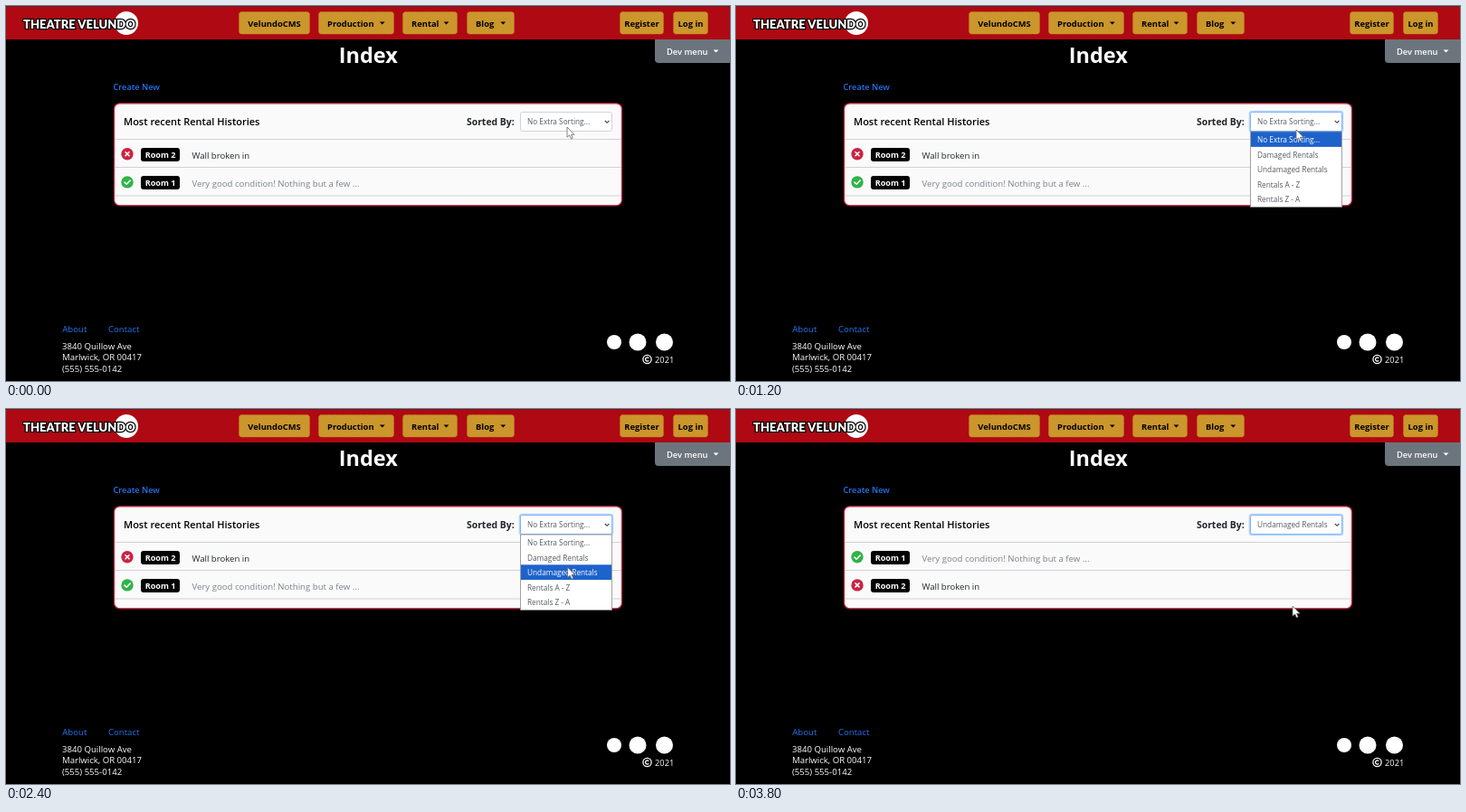
Animation, 800 px wide and 415 px high, one loop 3900 ms. Source, as an HTML page:

```html
<!DOCTYPE html>
<html lang="en">
<head>
<meta charset="utf-8">
<title>Rental histories</title>
<style>
  html, body { margin: 0; width: 100%; height: 100%; overflow: hidden; background: #000; }
  svg { display: block; width: 800px; height: 415px; font: 9.6px "Open Sans", sans-serif; }
  .brand { font: 900 13px Lato, sans-serif; fill: #fff; stroke: #000; stroke-width: 2.4; paint-order: stroke; stroke-linejoin: round; }
  .nav rect { fill: #cb962b; stroke: #b98722; stroke-width: .7; stroke-dasharray: 1.5 1; }
  .nav text { font-weight: 700; font-size: 9.4px; }
  .bold { font-weight: 700; }
  .semi { font-weight: 600; }
  .link { fill: #2474f0; }
  .white { fill: #fff; }
  .ink { fill: #212529; }
  .small { font-size: 8.25px; fill: #555b61; }
  .line { stroke: #d2d2d6; }
  .mark { fill: none; stroke: #fff; stroke-width: 1.6; stroke-linecap: round; stroke-linejoin: round; }
</style>
</head>
<body>
<svg viewBox="0 0 800 415">
  <defs><path id="caret" d="M-2.9-1.4H2.9L0 1.5Z"/></defs>
  <rect width="800" height="415"/>
  <rect width="800" height="37" fill="#af0913"/>
  <rect width="800" height="1" fill="#6b1a20"/>
  <circle cx="133" cy="19" r="13" fill="#fff"/>
  <text class="brand" x="19" y="24.8">THEATRE VELUNDO</text>
  <g class="nav" id="nav"></g>

  <path d="M800 37V63H721a4 4 0 0 1-4-4V37Z" fill="#6c757d"/>
  <text class="white semi" x="730" y="53.7" font-size="9.3">Dev menu</text>
  <use href="#caret" x="784.5" y="50" fill="#fff"/>
  <text class="white bold" x="400.3" y="62.6" font-size="23.5" text-anchor="middle">Index</text>
  <text class="link semi" x="118.5" y="93.3" font-size="9.2">Create New</text>

  <rect x="119.5" y="107.8" width="561" height="113" rx="6" fill="#fafafb" stroke="#c5203a" stroke-width="1.3"/>
  <path class="line" d="M120.5 147.5H680M120.5 178.5H680M120.5 210H680"/>
  <text class="semi" x="130" y="132.3" font-size="11">Most recent Rental Histories</text>
  <text class="ink bold" x="509" y="132" font-size="10.4">Sorted By:</text>

  <g id="damaged">
    <circle cx="134" cy="163.8" r="6.7" fill="#cb2341"/>
    <path class="mark" d="M132 161.8l4 4m0-4l-4 4"/>
    <rect x="149" y="157" width="43" height="15" rx="3"/>
    <text class="white bold" x="170.5" y="168.3" font-size="9.1" text-anchor="middle">Room 2</text>
    <text class="ink" x="205.5" y="169.3">Wall broken in</text>
  </g>
  <g id="sound">
    <circle cx="134" cy="163.8" r="6.7" fill="#2fb347"/>
    <path class="mark" d="M131 164l2.2 2.2 4-4.2"/>
    <rect x="149" y="157" width="43" height="15" rx="3"/>
    <text class="white bold" x="170.5" y="168.3" font-size="9.1" text-anchor="middle">Room 1</text>
    <text x="205.5" y="169.3" font-size="9.65" fill="#7b8188">Very good condition! Nothing but a few ...</text>
  </g>
  <g id="dots" class="ink">
    <circle cx="666" cy="160.3" r="1.3"/><circle cx="666" cy="164.2" r="1.3"/><circle cx="666" cy="168.1" r="1.3"/>
  </g>

  <rect id="glow" x="566.7" y="115.7" width="104.6" height="24.6" rx="3.5" fill="#b5d3fd"/>
  <rect id="select" x="568.5" y="117.5" width="101" height="21" rx="2" fill="#fff"/>
  <text id="choice" class="small" x="576" y="131.2"></text>
  <path d="M661.8 127l2.3 2.3 2.3-2.3" fill="none" stroke="#444" stroke-width="1.1"/>
  <g id="menu">
    <rect x="568.5" y="139" width="101" height="83.5" fill="#fff" stroke="#8b8b8b" stroke-width=".8"/>
    <rect id="hover" x="569" width="100" height="16.7" fill="#1e62cb"/>
  </g>

  <text class="link" x="62.3" y="360.7">About</text>
  <text class="link" x="113" y="360.7">Contact</text>
  <g class="white">
    <text x="62" y="379.7">3840 Quillow Ave</text>
    <text x="62" y="392">Marlwick, OR 00417</text>
    <text x="62" y="404.5">(555) 555-0142</text>
    <circle cx="672" cy="372" r="8"/><circle cx="698" cy="372" r="9.5"/><circle cx="727.5" cy="372" r="9.5"/>
    <text x="717" y="394.5" font-size="9.3">2021</text>
  </g>
  <g fill="none" stroke="#fff" stroke-width="1.3">
    <circle cx="708.5" cy="391" r="4.6"/><path d="M710.2 389.6a2.1 2.1 0 1 0 0 2.8"/>
  </g>
  <path id="cursor" d="M0 0V11.2L2.6 8.9 4.4 12.9 6.2 12.1 4.5 8.3H8Z" fill="#fff" stroke="#666" stroke-width=".8"/>
</svg>
<script>
const LOOP = 3900, STEP = 100, OPEN = 200, PICK = 2900, ITEM = 16.57, MENU_TOP = 139.2, ROW = 31.1;
const options = ["No Extra Sorting...", "Damaged Rentals", "Undamaged Rentals", "Rentals A - Z", "Rentals Z - A"];
// time, x, y of the pointer tip
const path = [[0, 620, 134], [400, 620, 132], [1200, 619, 137], [2000, 620, 171],
              [2700, 621, 178], [3200, 621, 179], [3800, 615, 218]];
const $ = id => document.getElementById(id);

function add(parent, name, attrs, text = "") {
  const node = document.createElementNS("http://www.w3.org/2000/svg", name);
  for (const key in attrs) node.setAttribute(key, attrs[key]);
  node.textContent = text;
  return parent.appendChild(node);
}

function navButton(label, left, right, caretX) {
  add($("nav"), "rect", { x: left + .5, y: 6.5, width: right - left - 1, height: 24.5, rx: 3 });
  const middle = (left + right) / 2;
  add($("nav"), "text", caretX ? { x: left + 10, y: 22.7 } : { x: middle, y: 22.7, "text-anchor": "middle" }, label);
  if (caretX) add($("nav"), "use", { href: "#caret", x: caretX, y: 19 });
}
navButton("VelundoCMS", 257, 336);
navButton("Production", 345, 429, 415.8);
navButton("Rental", 438, 499, 486.5);
navButton("Blog", 509, 562, 549.3);
navButton("Register", 678, 727);
navButton("Log in", 737, 776);

const items = options.map((label, i) =>
  add($("menu"), "text", { class: "small", x: 576, y: 151.2 + i * ITEM }, label));

function pointerAt(t) {
  const next = Math.max(1, path.findIndex(p => p[0] >= t));
  const [t0, x0, y0] = path[next - 1], [t1, x1, y1] = path[next];
  const u = (t - t0) / (t1 - t0), k = u * u * (3 - 2 * u);
  return [x0 + (x1 - x0) * k, y0 + (y1 - y0) * k];
}

const show = (id, on) => $(id).style.display = on ? "" : "none";
const moveTo = (id, x, y) => $(id).setAttribute("transform", `translate(${x} ${y})`);

function draw(now) {
  const t = Math.floor(now % LOOP / STEP) * STEP;
  const [x, y] = pointerAt(t);
  const picked = t >= PICK, open = t >= OPEN && !picked;
  const active = Math.max(0, Math.floor((y - MENU_TOP) / ITEM));

  moveTo("cursor", x, y);
  moveTo("damaged", 0, picked ? ROW : 0);
  moveTo("sound", 0, picked ? 0 : ROW);
  show("dots", picked && y < 210);
  moveTo("dots", 0, y < 180 ? 0 : ROW);
  show("glow", t >= OPEN);
  $("select").setAttribute("stroke", t >= OPEN ? "#80b4fb" : "#ced4da");
  $("choice").textContent = options[picked ? 2 : 0];
  show("menu", open);
  $("hover").setAttribute("y", MENU_TOP + active * ITEM);
  items.forEach((item, i) => item.style.fill = i === active ? "#fff" : "");
  requestAnimationFrame(draw);
}
requestAnimationFrame(draw);
</script>
</body>
</html>
```
